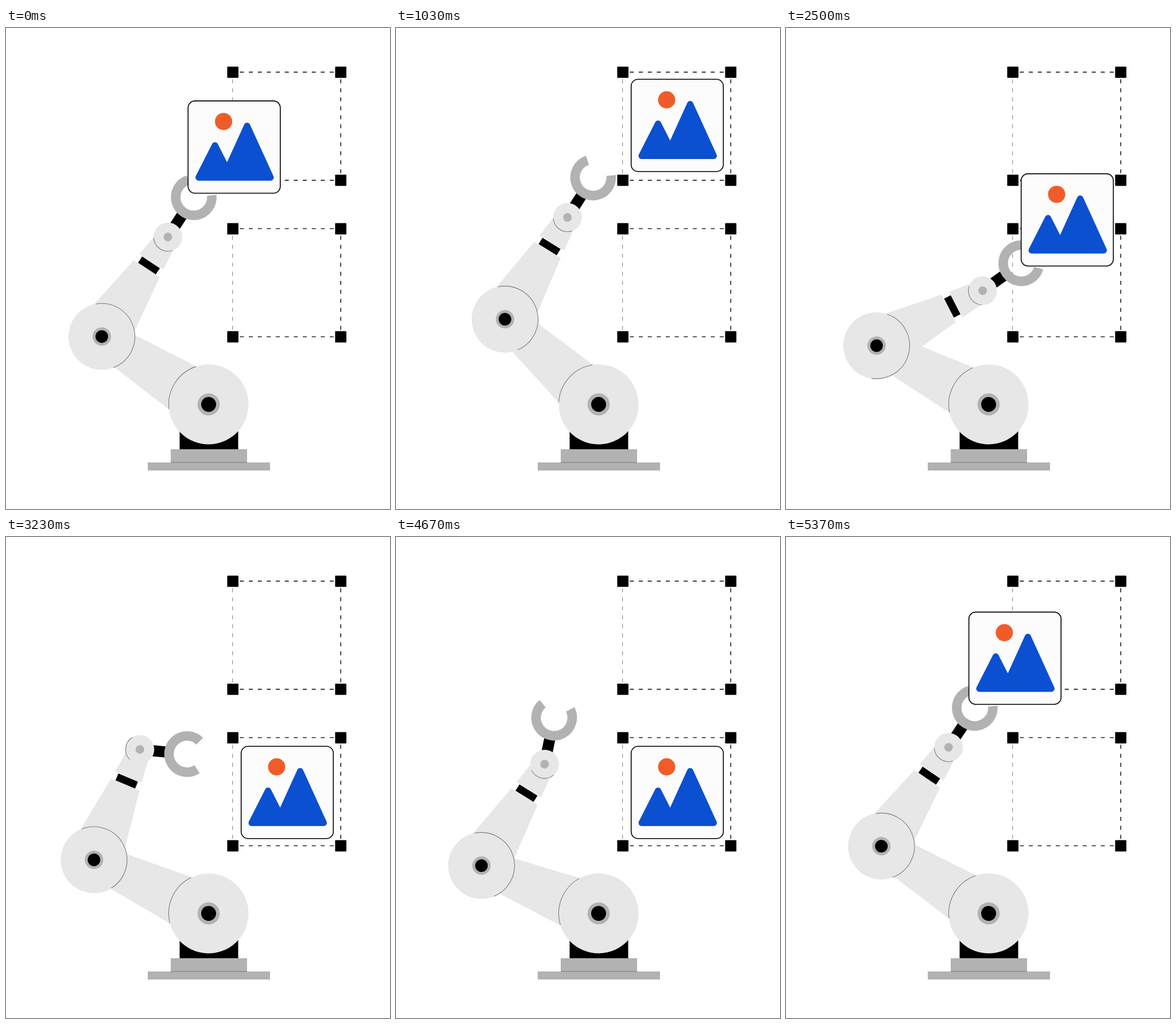
An HTML page for the animation above (5410 ms loop, 669 by 837 pixels).

```html
<!DOCTYPE html>
<html lang="en">
<head>
<meta charset="utf-8">
<title>Robot arm</title>
<style>
  html, body { margin: 0; width: 100%; height: 100%; overflow: hidden; background: #fff; }
  svg { display: block; width: 669px; height: 837px; }
  .body { fill: #e7e7e7; }
  .metal { fill: #b2b2b2; }
  .seam { fill: none; stroke: #7c7c7c; stroke-width: 1.1; }
  .dash { stroke: #000; stroke-width: 1.4; stroke-dasharray: 7 8.667; stroke-dashoffset: 3.5; }
  .thin { stroke: #777; stroke-width: 1; }
</style>
</head>
<body>
<svg viewBox="0 0 669 837" xmlns="http://www.w3.org/2000/svg">
  <g id="slots"></g>

  <rect x="302.5" y="690" width="102" height="43"/>
  <rect class="metal" x="287" y="733" width="133" height="23"/>
  <rect class="metal" x="247" y="756" width="213" height="14"/>
  <path class="seam" d="M287 756H420"/>

  <g id="upper">
    <path class="body" d="M40 -45.8L200 -30.6V30.6L40 45.8Z"/>
    <circle class="body" r="69.5"/>
    <path class="seam" data-arc="69.5 -39 39"/>
    <circle class="metal" r="19.3"/>
    <circle r="13"/>
  </g>

  <g id="fore">
    <path class="body" d="M20 -45L141.5 -27V27L20 45Z"/>
    <path class="body" d="M156 -25L208 -19V19L156 25Z"/>
    <rect x="142" y="-18.5" width="13" height="37"/>
    <circle class="body" r="58"/>
    <path class="seam" data-arc="57.6 -126 44"/>
    <circle class="metal" r="16"/>
    <circle r="11"/>
  </g>

  <g id="hand">
    <rect x="20" y="-9.7" width="26" height="19.4"/>
    <path data-arc="31.5 51 309" transform="translate(82.6 0)" fill="none" stroke="#b2b2b2" stroke-width="16.6"/>
    <circle class="body" r="25"/>
    <path class="seam" data-arc="24.8 127 231"/>
    <circle class="metal" r="7.5"/>
  </g>

  <g id="card">
    <rect x="-80.3" y="-80.3" width="160.6" height="160.6" rx="12" fill="#fcfcfc" stroke="#000" stroke-width="1.6"/>
    <circle cx="-18.5" cy="-44.5" r="15" fill="#f05c28"/>
    <path d="M-62 53L-33.5 -3L-5 53ZM-18.5 53L22.5 -37L63.5 53Z" fill="#0b50d0" stroke="#0b50d0" stroke-width="11" stroke-linejoin="round"/>
  </g>
</svg>
<script>
const LOOP = 5410;
const SHOULDER = { x: 353, y: 655 };
const UPPER = 220.4, FORE = 208, HAND = 82.6;

// Card centres, and the card's offset from the claw while it is gripped
const SLOT_1 = { x: 490, y: 169.5 };
const SLOT_2 = { x: 490, y: 444.5 };
const CARRIED = { x: 397.5, y: 207.3 };
const GRIP = { x: 70.4, y: -87.3 };

// Joint angles in degrees above the horizontal
const carry = { upper: 32.4, fore: 56.4, hand: 56.9 };
const windUp = { upper: 28.5, fore: 58.5, hand: 60 };
const atSlot1 = { upper: 55.4, fore: 45.2, hand: carry.hand };
const atSlot2 = { upper: 9, fore: 15.3, hand: 21 };
const ready = { upper: 41.1, fore: 59.6, hand: 57.3 };
const coil = { ...ready, upper: 39.6 };
const rest = { upper: 25.3, fore: 68.3, hand: -6 };
const turnHand = (pose, hand) => ({ ...pose, hand });

let pose = carry, clock = 0;
const moves = [];
function move(to, duration) {
  const segment = { from: pose, to, start: clock, end: clock + duration };
  moves.push(segment);
  pose = to;
  clock = segment.end;
  return segment;
}

move(windUp, 130);
const put = move(atSlot1, 460);
move(ready, 540);
move(turnHand(ready, 100), 270);
move(ready, 290);
move(coil, 140);
move(atSlot1, 415);
const lower = move(atSlot2, 455);
move(atSlot2, 100);
move(rest, 470);
move(turnHand(rest, -50), 290);
move(turnHand(rest, 92), 965);
move(atSlot2, 505);
const lift = move(carry, 370);
move(carry, LOOP - clock);

const $ = id => document.getElementById(id);
const rad = deg => deg * Math.PI / 180;
const mix = (a, b, k) => Object.fromEntries(Object.keys(a).map(key => [key, a[key] + (b[key] - a[key]) * k]));
const polar = (origin, length, deg) => ({
  x: origin.x + length * Math.cos(rad(deg)),
  y: origin.y - length * Math.sin(rad(deg))
});

function progress(t, { start, end }) {
  const u = Math.min(1, Math.max(0, (t - start) / (end - start)));
  return (1 - Math.cos(Math.PI * u)) / 2;
}

function place(id, { x, y }, angle) {
  $(id).setAttribute('transform', `translate(${x} ${y}) rotate(${angle})`);
}

function arcPath(radius, from, to) {
  const a = polar({ x: 0, y: 0 }, radius, from);
  const b = polar({ x: 0, y: 0 }, radius, to);
  return `M${a.x} ${a.y}A${radius} ${radius} 0 ${+(to - from > 180)} 0 ${b.x} ${b.y}`;
}

function slot(left, top, size = 188) {
  const right = left + size, bottom = top + size;
  const line = (d, extra = '') => `<path class="dash ${extra}" d="${d}"/>`;
  const corner = (x, y) => `<rect x="${x - 9.8}" y="${y - 9.8}" width="19.6" height="19.6" rx="1"/>`;
  return line(`M${left} ${top - 0.3}H${right}`) + line(`M${left} ${bottom}H${right}`) +
    line(`M${left - 0.5} ${top}V${bottom}`, 'thin') + line(`M${right} ${top}V${bottom}`) +
    corner(left, top) + corner(right, top) + corner(left, bottom) + corner(right, bottom);
}

function placeCard(t, claw, hand) {
  if (t < put.end) {
    const turn = carry.hand - hand;
    const cos = Math.cos(rad(turn)), sin = Math.sin(rad(turn));
    place('card', {
      x: claw.x + GRIP.x * cos - GRIP.y * sin,
      y: claw.y + GRIP.x * sin + GRIP.y * cos
    }, turn);
  } else if (t < lift.start) {
    place('card', mix(SLOT_1, SLOT_2, progress(t, lower)), 0);
  } else {
    place('card', mix(SLOT_2, CARRIED, progress(t, lift)), 0);
  }
}

function render(t) {
  const current = moves.find(segment => t < segment.end);
  const { upper, fore, hand } = mix(current.from, current.to, progress(t, current));
  const elbow = polar(SHOULDER, UPPER, 180 - upper);
  const wrist = polar(elbow, FORE, fore);
  const claw = polar(wrist, HAND, hand);
  place('upper', SHOULDER, 180 + upper);
  place('fore', elbow, -fore);
  place('hand', wrist, -hand);
  placeCard(t, claw, hand);
}

$('slots').innerHTML = slot(395.2, 77) + slot(395.2, 349.4);
for (const path of document.querySelectorAll('[data-arc]')) {
  path.setAttribute('d', arcPath(...path.dataset.arc.split(' ').map(Number)));
}

const startTime = performance.now();
function tick() {
  render((performance.now() - startTime) % LOOP);
  requestAnimationFrame(tick);
}
tick();
</script>
</body>
</html>
```
